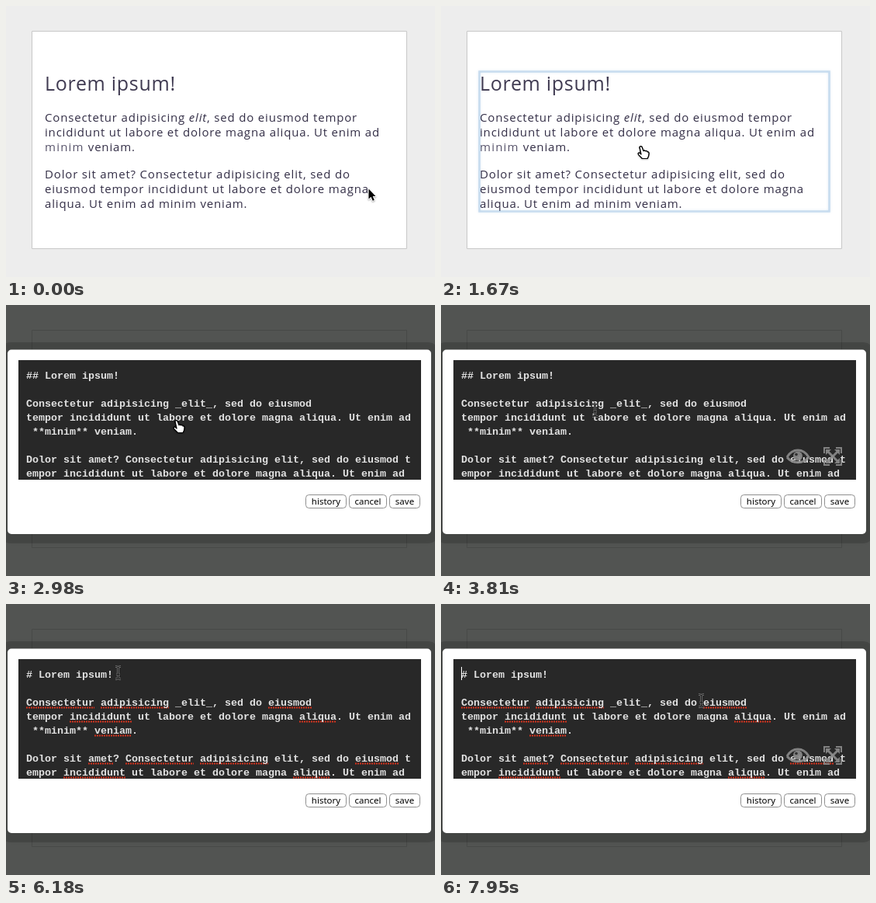
An HTML page with a canvas that plays this animation: 553 by 349 pixels, repeating every 8000 ms.

```html
<!DOCTYPE html>
<html lang="en">
<head>
<meta charset="utf-8">
<title>Inline text editing</title>
<style>
  html, body { margin: 0; width: 100%; height: 100%; overflow: hidden; background: #ededed; }
  canvas { display: block; }
</style>
</head>
<body>
<canvas id="stage" width="553" height="349"></canvas>
<script>
const ctx = document.getElementById('stage').getContext('2d');
const LOOP = 8000;
const SANS = '"Open Sans", "Noto Sans", sans-serif';
const MONO = '"Liberation Mono", monospace';
const INK = '#332e46';
const CELL = 8;
const MISSPELT = /Consectetur|adipisicing|eiusmod|incididunt|aliqua|veniam|amet/g;

const BODY = [
  'Consectetur adipisicing _elit_, sed do eiusmod',
  'tempor incididunt ut labore et dolore magna aliqua. Ut enim ad',
  ' **minim** veniam.',
  '',
  'Dolor sit amet? Consectetur adipisicing elit, sed do eiusmod t',
  'empor incididunt ut labore et dolore magna aliqua. Ut enim ad'
];

// Pointer moves: one point per step between the two times.
const MOVES = [
  { from: 0, to: 0, pts: [[467, 235]] },
  { from: 470, to: 1190, pts: [[494, 205], [478, 130], [400, 82], [290, 79], [224, 130], [232, 178], [266, 192]] },
  { from: 1670, to: 2260, pts: [[260, 188], [248, 178], [236, 167], [227, 160], [223, 157], [222, 156]] },
  { from: 3220, to: 4280, pts: [[226, 158], [232, 160], [234, 157], [228, 154], [215, 148], [198, 135], [174, 112], [153, 92], [145, 84], [144, 88]] },
  { from: 6540, to: 6890, pts: [[160, 102], [192, 138], [220, 174], [230, 193]] },
  { from: 7250, to: 7950, pts: [[236, 190], [250, 180], [270, 165], [290, 150], [310, 138], [326, 129], [335, 124]] }
];

// Caret states: [start, x], where 0 hides it.
const CARET = [[0, 0], [4280, 146], [4750, 26], [4980, 34], [5460, 0], [5700, 26], [6180, 0], [6770, 26], [7250, 0], [7720, 26]];

function pointer(t) {
  const { from, to, pts } = MOVES.filter(m => m.from <= t).pop();
  const last = pts.length - 1;
  const i = to > from ? Math.floor((t - from + 4) / (to - from) * last) : 0;
  return pts[Math.min(last, i)];
}

function text(str, x, y, font, color, spacing = 0) {
  ctx.font = font;
  ctx.fillStyle = color;
  ctx.letterSpacing = spacing + 'px';
  ctx.fillText(str, x, y);
  const width = ctx.measureText(str).width;
  ctx.letterSpacing = '0px';
  return x + width;
}

function box(x, y, w, h, r, fill, stroke) {
  ctx.beginPath();
  ctx.roundRect(x, y, w, h, r);
  if (fill) { ctx.fillStyle = fill; ctx.fill(); }
  if (stroke) { ctx.strokeStyle = stroke; ctx.lineWidth = 1; ctx.stroke(); }
}

function drawPage() {
  ctx.fillStyle = '#ededed';
  ctx.fillRect(0, 0, 553, 349);
  box(33.5, 32.5, 483, 280, 0, '#fff', '#c8c8c8');
  const font = '15px ' + SANS;
  const line = (str, x, y) => text(str, x, y, font, INK, 0.82);
  text('Lorem ipsum!', 50, 109, '25px ' + SANS, '#403b52', 0.7);
  let x = line('Consectetur adipisicing ', 50, 149);
  x = text('elit', x, 149, 'italic ' + font, INK, 0.82);
  line(', sed do eiusmod tempor', x, 149);
  line('incididunt ut labore et dolore magna aliqua. Ut enim ad', 50, 168);
  x = text('minim ', 50, 187, font, '#57536a', 1.2);
  line('veniam.', x, 187);
  line('Dolor sit amet? Consectetur adipisicing elit, sed do', 50, 222);
  line('eiusmod tempor incididunt ut labore et dolore magna', 50, 241);
  line('aliqua. Ut enim ad minim veniam.', 50, 260);
}

function drawHighlight(alpha) {
  ctx.save();
  ctx.globalAlpha = alpha;
  ctx.shadowColor = '#6fa3d6';
  ctx.shadowBlur = 3;
  ctx.strokeStyle = '#699fd2';
  ctx.lineWidth = 2.6;
  ctx.strokeRect(49.5, 84.5, 451, 180);
  ctx.restore();
}

function drawDialog() {
  ctx.fillStyle = '#525452';
  ctx.fillRect(0, 0, 553, 349);
  box(33.5, 32.5, 483, 280, 0, null, '#474947');
  ctx.save();
  ctx.shadowColor = 'rgba(0,0,0,.2)';
  ctx.shadowBlur = 4;
  box(-8, 48, 566, 259, 14, 'rgba(0,0,0,.15)');
  ctx.restore();
  box(2, 57.5, 546, 237.5, 5, '#fff');
  ctx.fillStyle = '#282828';
  ctx.fillRect(16, 71, 519, 154);
  ctx.textAlign = 'center';
  [['history', 386, 53], ['cancel', 442, 49], ['save', 494, 40]].forEach(([label, x, w]) => {
    box(x + 0.5, 244.5, w - 1, 17, 4, '#fff', '#8f8f8f');
    text(label, x + w / 2, 257, '11.5px "Noto Sans", sans-serif', '#000');
  });
  ctx.textAlign = 'left';
}

function underline(x, y, w) {
  ctx.strokeStyle = '#d8321c';
  ctx.lineWidth = 2;
  ctx.setLineDash([2, 1]);
  ctx.beginPath();
  ctx.moveTo(x, y);
  ctx.lineTo(x + w, y);
  ctx.stroke();
  ctx.setLineDash([]);
}

function drawSource(t) {
  const font = 'bold 13.333px ' + MONO;
  const title = (t < 5700 ? '##' : '#') + ' Lorem ipsum!';
  text(title, 26, 95, font, '#e2e2e2');
  BODY.forEach((str, i) => {
    const y = 131 + i * 18;
    if (t >= 4280) {
      for (const m of str.matchAll(MISSPELT)) underline(26 + m.index * CELL, y + 2.5, m[0].length * CELL);
    }
    text(str, 26, y, font, '#e2e2e2');
  });
  const x = CARET.filter(c => c[0] <= t).pop()[1];
  if (x) {
    ctx.fillStyle = '#fff';
    ctx.fillRect(x, 81, 1, 17);
  }
}

function drawEye() {
  ctx.beginPath();
  ctx.moveTo(446, 196);
  ctx.bezierCurveTo(453, 184, 467, 184, 474, 196);
  ctx.bezierCurveTo(467, 205, 453, 205, 446, 196);
  ctx.lineWidth = 3;
  ctx.stroke();
  ctx.beginPath();
  ctx.arc(460, 194.5, 6, 0, 7);
  ctx.fill();
  ctx.fillStyle = '#282828';
  ctx.beginPath();
  ctx.arc(458, 192.5, 1.8, 0, 7);
  ctx.fill();
}

function drawExpand() {
  for (let i = 0; i < 4; i++) {
    ctx.save();
    ctx.translate(505, 195);
    ctx.rotate(i * Math.PI / 2);
    ctx.lineWidth = 2;
    ctx.beginPath();
    ctx.moveTo(4, -11);
    ctx.lineTo(11, -11);
    ctx.lineTo(11, -4);
    ctx.stroke();
    ctx.lineWidth = 3;
    ctx.beginPath();
    ctx.moveTo(0, 0);
    ctx.lineTo(6, -6);
    ctx.stroke();
    ctx.beginPath();
    ctx.moveTo(2, -9);
    ctx.lineTo(9, -9);
    ctx.lineTo(9, -2);
    ctx.fill();
    ctx.restore();
  }
}

function drawIcons() {
  ctx.save();
  ctx.globalAlpha = 0.9;
  ctx.strokeStyle = ctx.fillStyle = '#8c8c8c';
  drawExpand();
  drawEye();
  ctx.restore();
}

const ARROW = new Path2D('M0 0V13L3 10.3L5.2 15.3L7.3 14.4L5.2 9.5H9Z');
const HAND = new Path2D('M-4.5-6.5Q-3.5-9-1.5-7L.5-1.8Q2-3 3-1.5Q5-2.5 5.5-.5Q7.5-1 7.5 1.5L7 5L5.5 8H-1L-6 2.8Q-7 0-4.5.7L-2.5 2.5Z');
const BEAM = new Path2D('M-3.5-8Q-.5-8 0-6.5Q.5-8 3.5-8M0-6.5V6.5M-3.5 8Q-.5 8 0 6.5Q.5 8 3.5 8M-2 2H2');

function drawPointer(t) {
  const [x, y] = pointer(t);
  ctx.save();
  ctx.translate(x + 0.5, y + 0.5);
  ctx.lineJoin = 'round';
  if (t >= 3220) {
    ctx.strokeStyle = '#858585';
    ctx.lineWidth = 2.6;
    ctx.stroke(BEAM);
    ctx.strokeStyle = '#181818';
    ctx.lineWidth = 1.2;
    ctx.stroke(BEAM);
  } else {
    const hand = t >= 1670;
    const shape = hand ? HAND : ARROW;
    ctx.shadowColor = 'rgba(0,0,0,.35)';
    ctx.shadowBlur = 2;
    ctx.shadowOffsetY = 1;
    ctx.strokeStyle = hand ? '#000' : '#fff';
    ctx.fillStyle = hand ? '#fff' : '#000';
    ctx.lineWidth = hand ? 1.2 : 1.8;
    ctx.stroke(shape);
    ctx.shadowColor = 'transparent';
    ctx.fill(shape);
    if (hand) ctx.stroke(shape);
  }
  ctx.restore();
}

function draw(t) {
  if (t < 2980) {
    drawPage();
    if (t >= 1670) drawHighlight(Math.min(1, (Math.floor((t - 1670) / 118) + 1) / 4));
  } else {
    drawDialog();
    drawSource(t);
    if ((t >= 3220 && t < 4630) || t >= 6540) drawIcons();
  }
  drawPointer(t);
}

const start = performance.now();
function tick() {
  draw((performance.now() - start) % LOOP);
  requestAnimationFrame(tick);
}
tick();
</script>
</body>
</html>
```
